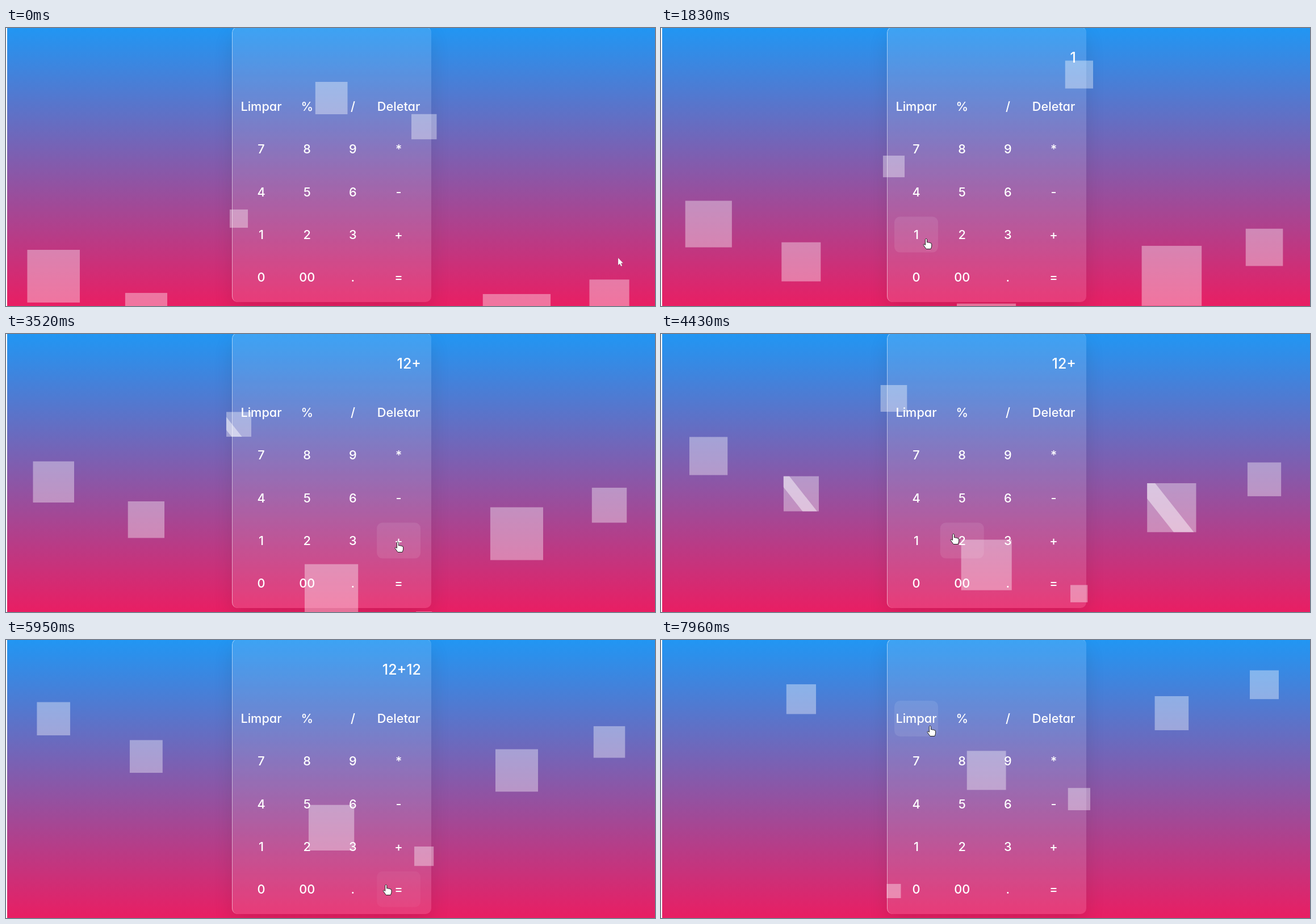
An HTML page that plays this animation: 1143 px wide and 490 px high, repeating every 8000 ms.

```html
<!DOCTYPE html>
<html lang="pt">
<head>
<meta charset="utf-8">
<title>Calculadora</title>
<style>
html, body { margin: 0; width: 100%; height: 100%; overflow: hidden; }
body { background: linear-gradient(#2196f3, #e91e63); position: relative; }
#edge { position: absolute; left: 0; top: 0; width: 2px; height: 100%; background: #fff; }
#panel {
  position: absolute; box-sizing: border-box; left: 398px; top: -2px; width: 351px; height: 485px;
  border-radius: 10px; background: rgba(255,255,255,.125);
  border-left: 1px solid rgba(255,255,255,.5); border-top: 1px solid rgba(255,255,255,.3);
  box-shadow: 0 15px 35px rgba(0,0,0,.1);
}
#stage { position: absolute; left: 0; top: 0; }
text {
  font: 500 21.7px Inter, "Open Sans", sans-serif; font-feature-settings: "cv11";
  fill: #fff; text-anchor: middle;
}
#display { font-size: 25px; text-anchor: end; }
</style>
</head>
<body>
<div id="edge"></div>
<div id="panel"></div>
<svg id="stage" width="1143" height="490">
  <g id="keys"></g>
  <text id="display" x="731" y="61"></text>
  <g id="cubes" fill="#fff"></g>
  <g id="cursor" fill="#fff" stroke-linejoin="round">
    <path id="arrow" stroke="#444" stroke-opacity=".35" stroke-width=".6" d="M0 0V13L3 10.4L5.2 15L7.2 14L5.2 9.6H9Z"/>
    <path id="hand" stroke="#222" d="M-1.6 11.5V1.4Q-.1-.9 1.4 1.4V7Q3 5.8 4.2 7.4Q6 6.4 7 8Q9.4 7.4 9.6 10V14L8 18.5H0L-5 11.5Q-5 8.7-1.6 11.5Z"/>
  </g>
</svg>
<script>
const LOOP = 8000;
const $ = id => document.getElementById(id);
const mod = (a, n) => (a % n + n) % n;

function set(el, attrs) {
  for (const k in attrs) el.setAttribute(k, attrs[k]);
}
function add(parent, tag, attrs) {
  const el = document.createElementNS("http://www.w3.org/2000/svg", tag);
  set(el, attrs);
  return parent.appendChild(el);
}

// Calculator keys on a four-column grid
const labels = "Limpar % / Deletar 7 8 9 * 4 5 6 - 1 2 3 + 0 00 . =".split(" ");
const keys = labels.map((label, i) => {
  const x = 449.5 + i % 4 * 80.7, y = 138.5 + Math.floor(i / 4) * 75.2;
  const box = add($("keys"), "rect", { x: x - 38.5, y: y - 31.5, width: 77, height: 63, rx: 10, fill: "#fff" });
  add($("keys"), "text", { x, y: y + 7.7 }).textContent = label;
  return { x, y, box };
});
const isOver = (key, [x, y]) => Math.abs(x - key.x) < 38.5 && Math.abs(y - key.y) < 31.5;

// Squares rise through the stage while shrinking or growing to one size, then start again
const END_Y = 64, TRAVEL = 506, SPEED = .0502, END_SIZE = 50.4, SHINE_PERIOD = 3024;
const cubes = [
  { y: 437.5, size: 108, delay: 2 },
  { y: 504, size: 78, delay: 1 },
  { y: 336, size: 17, delay: 0 },
  { y: 123.5, size: 108, delay: 2 },
  { y: 174, size: 25, delay: 2 },
  { y: 528.7, size: 126, delay: 1 },
  { y: 478.5, size: 75, delay: .5 }
].map((cube, i) => {
  const el = add($("cubes"), "svg", { viewBox: "0 0 1 1" });
  add(el, "rect", { width: 1, height: 1, opacity: .38 });
  const shine = add(el, "polygon", { points: "0,0 .41,0 1.2,1 .79,1", opacity: .45 });
  return { ...cube, x: 83.7 + i * 163.14, el, shine };
});

function drawCube(c, t) {
  const left = mod(c.y - END_Y - SPEED * t, TRAVEL);
  const size = END_SIZE + (c.size - END_SIZE) * left / TRAVEL;
  set(c.el, { x: c.x - size / 2, y: END_Y + left - size / 2, width: size, height: size });
  const half = SHINE_PERIOD / 2;
  const since = mod(t - 324 - c.delay * SHINE_PERIOD / 3 + half, SHINE_PERIOD) - half;
  set(c.shine, { transform: `translate(${-since * .0033} 0)` });
}

// Pointer stops; each is reached by an eased glide and may press a key
const GLIDE = 700, PRESS = 80, FADE = 150;
const stops = [
  { at: 0, x: 1078, y: 405 },
  { at: 1210, x: 486, y: 379 },
  { at: 1550, x: 460, y: 372, key: "1" },
  { at: 2400, x: 537, y: 361, key: "2" },
  { at: 3200, x: 690, y: 366, key: "+" },
  { at: 4430, x: 515, y: 352 },
  { at: 4750, x: 460, y: 366, key: "1" },
  { at: 5280, x: 528, y: 363, key: "2" },
  { at: 6100, x: 688, y: 440, key: "=" },
  { at: 6730, x: 587, y: 118 },
  { at: 7200, x: 474, y: 151, key: "Limpar" }
];

function pointer(t) {
  const i = stops.findIndex(s => s.at > t);
  const to = stops.at(i), from = stops[i - 1];
  if (!from) return [to.x, to.y];
  const span = Math.min(GLIDE, to.at - from.at);
  const u = Math.max(0, 1 - (to.at - t) / span), k = u * u * (3 - 2 * u);
  return [from.x + (to.x - from.x) * k, from.y + (to.y - from.y) * k];
}

function press(shown, key) {
  if (key === "Limpar") return "";
  if (key === "=") return String(shown.split("+").reduce((sum, n) => sum + Number(n), 0));
  return shown + key;
}

function draw(t) {
  cubes.forEach(c => drawCube(c, t));
  $("display").textContent = stops
    .filter(s => s.key && s.at + PRESS <= t)
    .reduce((shown, s) => press(shown, s.key), "");

  // A key lights up the longer the pointer has been over it
  const pos = pointer(t);
  const recent = Array.from({ length: 10 }, (_, i) => pointer(Math.max(0, t - i * FADE / 10)));
  for (const key of keys) {
    const share = isOver(key, pos) ? recent.filter(p => isOver(key, p)).length / recent.length : 0;
    set(key.box, { opacity: .09 * share });
  }
  const over = keys.some(key => isOver(key, pos));
  set($("cursor"), { transform: `translate(${pos})` });
  set($("hand"), { visibility: over ? "visible" : "hidden" });
  set($("arrow"), { visibility: over ? "hidden" : "visible" });
}

const start = performance.now();
function tick() {
  draw((performance.now() - start) % LOOP);
  requestAnimationFrame(tick);
}
tick();
</script>
</body>
</html>
```
